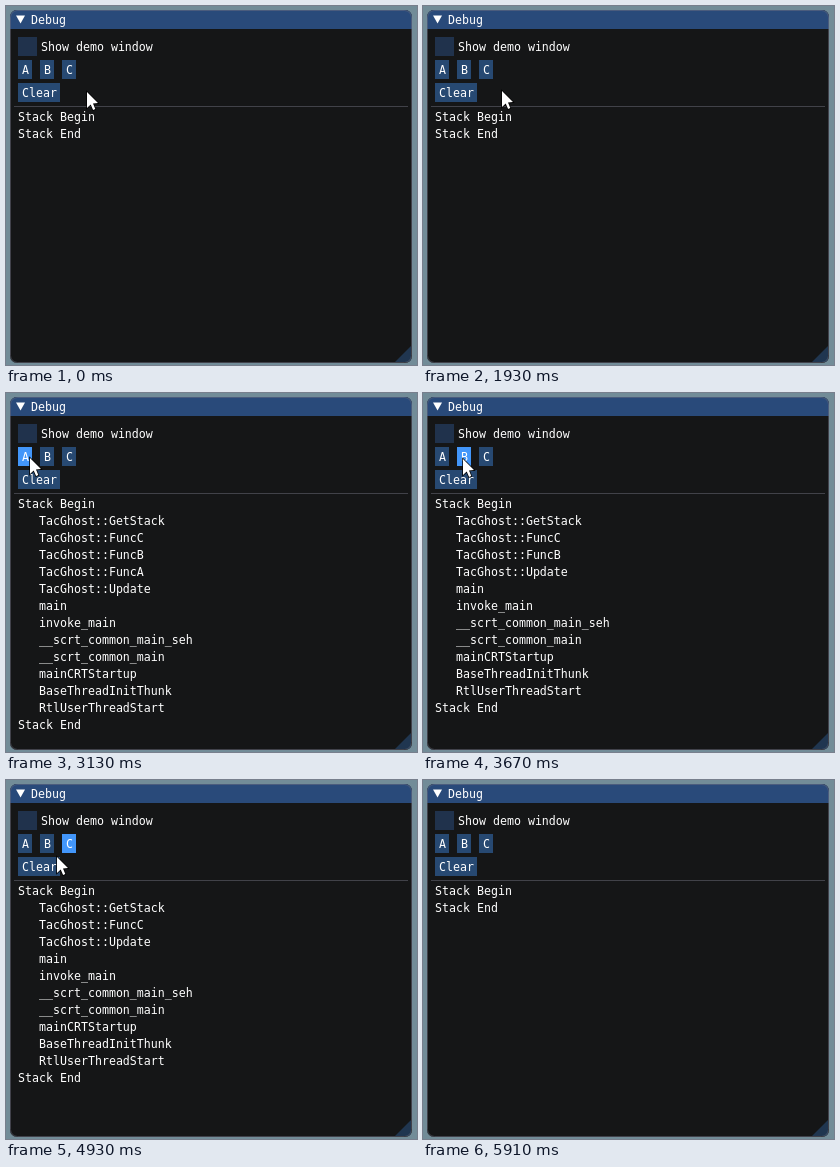
These frames come from a looping animation (411 by 359 pixels, 6350 ms). An HTML page with a canvas:

```html
<!DOCTYPE html>
<html lang="en">
<head>
<meta charset="utf-8">
<title>Debug</title>
<style>
html, body { margin: 0; width: 100%; height: 100%; overflow: hidden; background: #728c98; }
canvas { display: block; width: 411px; height: 359px; }
</style>
</head>
<body>
<canvas id="stage" width="411" height="359"></canvas>
<script>
const ctx = document.getElementById('stage').getContext('2d');
const LOOP = 6350;
const STEP = 30;       // pointer refresh
const HOVER_LAG = 60;  // highlight trails the pointer
const FONT = '11.628px "DejaVu Sans Mono", "Liberation Mono", monospace';
const ROW = 17;
const WIN = { x: 4, y: 4, w: 402, h: 353, r: 7 };

const COLOR = {
  desk: '#728c98', win: '#151617', title: '#294a7a', frame: '#20324c',
  button: '#274972', hover: '#4296fa', active: '#0f87fa',
  grip: '#203650', line: '#414249', border: 'rgba(110,110,128,.5)', text: '#fff'
};

const BUTTONS = [
  { name: 'A', x: 12, y: 54, w: 14 },
  { name: 'B', x: 34, y: 54, w: 14 },
  { name: 'C', x: 56, y: 54, w: 14 },
  { name: 'Clear', x: 12, y: 77, w: 42 }
];
const BUTTON_H = 19;

const RUNTIME = ['main', 'invoke_main', '__scrt_common_main_seh', '__scrt_common_main',
  'mainCRTStartup', 'BaseThreadInitThunk', 'RtlUserThreadStart'];

// pointer path: travel during [from, to], optionally click on arrival
const HOME = { x: 80, y: 85 };
const STOPS = [
  { from: 1900, to: 2140, x: 26, y: 71 },
  { from: 2250, to: 2430, x: 22, y: 64, click: 'A', down: 2740, up: 2860 },
  { from: 3100, to: 3310, x: 39, y: 65, click: 'B', down: 3570, up: 3670 },
  { from: 3870, to: 4080, x: 61, y: 65, click: 'C', down: 4390, up: 4550 },
  { from: 4820, to: 4980, x: 42, y: 83, click: 'Clear', down: 5350, up: 5410 },
  { from: 5560, to: 5950, x: 420, y: 400 }
];

const ease = p => p * p * (3 - 2 * p);

function pointerAt(t) {
  let { x, y } = HOME;
  for (const stop of STOPS) {
    if (t < stop.from) break;
    const elapsed = Math.floor((t - stop.from) / STEP) * STEP;
    const k = ease(Math.min(1, elapsed / (stop.to - stop.from)));
    x += (stop.x - x) * k;
    y += (stop.y - y) * k;
  }
  return { x: Math.round(x), y: Math.round(y) };
}

function rect(color, x, y, w, h) {
  ctx.fillStyle = color;
  ctx.fillRect(x, y, w, h);
}

function poly(points) {
  ctx.beginPath();
  points.forEach(([x, y]) => ctx.lineTo(x, y));
  ctx.closePath();
}

function label(str, x, baseline) {
  ctx.fillStyle = COLOR.text;
  ctx.fillText(str, x, baseline);
}

function drawWindow() {
  const { x, y, w, h, r } = WIN;
  const right = x + w, bottom = y + h;
  rect(COLOR.desk, 0, 0, 411, 359);
  ctx.save();
  ctx.beginPath();
  ctx.roundRect(x, y, w, h, r);
  ctx.clip();
  rect(COLOR.win, x, y, w, h);
  rect(COLOR.title, x, y, w, 19);
  ctx.fillStyle = COLOR.grip;
  poly([[right - 1, bottom - 17], [right - 1, bottom - 1], [right - 17, bottom - 1]]);
  ctx.fill();
  ctx.restore();

  ctx.strokeStyle = COLOR.border;
  ctx.lineWidth = 1;
  ctx.beginPath();
  ctx.roundRect(x + .5, y + .5, w - 1, h - 1, r);
  ctx.stroke();

  ctx.fillStyle = COLOR.text;
  poly([[10, 9.6], [19, 9.6], [14.5, 17.4]]);
  ctx.fill();
  label('Debug', 25, 18);
  rect(COLOR.frame, 12, 31, 19, 19);
  label('Show demo window', 35, 45);
  rect(COLOR.line, 8, 100, 394, 1);
}

function drawButtons(t) {
  const { x: px, y: py } = pointerAt(t - HOVER_LAG);
  const pressed = STOPS.find(s => t >= s.down && t < s.up)?.click;
  for (const { name, x, y, w } of BUTTONS) {
    const over = px >= x && px < x + w && py >= y && py < y + BUTTON_H;
    const color = name === pressed ? COLOR.active : over ? COLOR.hover : COLOR.button;
    rect(color, x, y, w, BUTTON_H);
    label(name, x + 4, y + 14);
  }
}

// each function calls the next letter, and C captures the stack
function stackRows(t) {
  const clicked = STOPS.findLast(s => t >= s.up)?.click ?? 'Clear';
  if (clicked === 'Clear') return [];
  const chain = [...'ABC'.slice('ABC'.indexOf(clicked))].reverse();
  const calls = ['GetStack', ...chain.map(c => 'Func' + c), 'Update'];
  return [...calls.map(f => 'TacGhost::' + f), ...RUNTIME];
}

function drawStack(t) {
  const rows = stackRows(t);
  const top = 115;
  label('Stack Begin', 12, top);
  rows.forEach((row, i) => label(row, 33, top + (i + 1) * ROW));
  label('Stack End', 12, top + (rows.length + 1) * ROW);
}

function drawPointer(t) {
  const { x, y } = pointerAt(t);
  ctx.save();
  ctx.translate(x + .5, y + .5);
  poly([[.5, .5], [.5, 16.5], [4.2, 13], [6.6, 18.5], [8.8, 17.6], [6.5, 12], [11.5, 11.6]]);
  ctx.strokeStyle = '#000';
  ctx.lineWidth = 1.5;
  ctx.stroke();
  ctx.fillStyle = '#fff';
  ctx.fill();
  if (t >= 480 && t < 690) {
    // busy ring
    ctx.beginPath();
    ctx.arc(14, 1, 5.7, 0, Math.PI * 2);
    ctx.strokeStyle = '#3aa5dc';
    ctx.lineWidth = 3;
    ctx.stroke();
  }
  ctx.restore();
}

function draw(t) {
  ctx.font = FONT;
  drawWindow();
  drawButtons(t);
  drawStack(t);
  drawPointer(t);
}

const start = performance.now();
function tick() {
  draw((performance.now() - start) % LOOP);
  requestAnimationFrame(tick);
}
tick();
</script>
</body>
</html>
```
